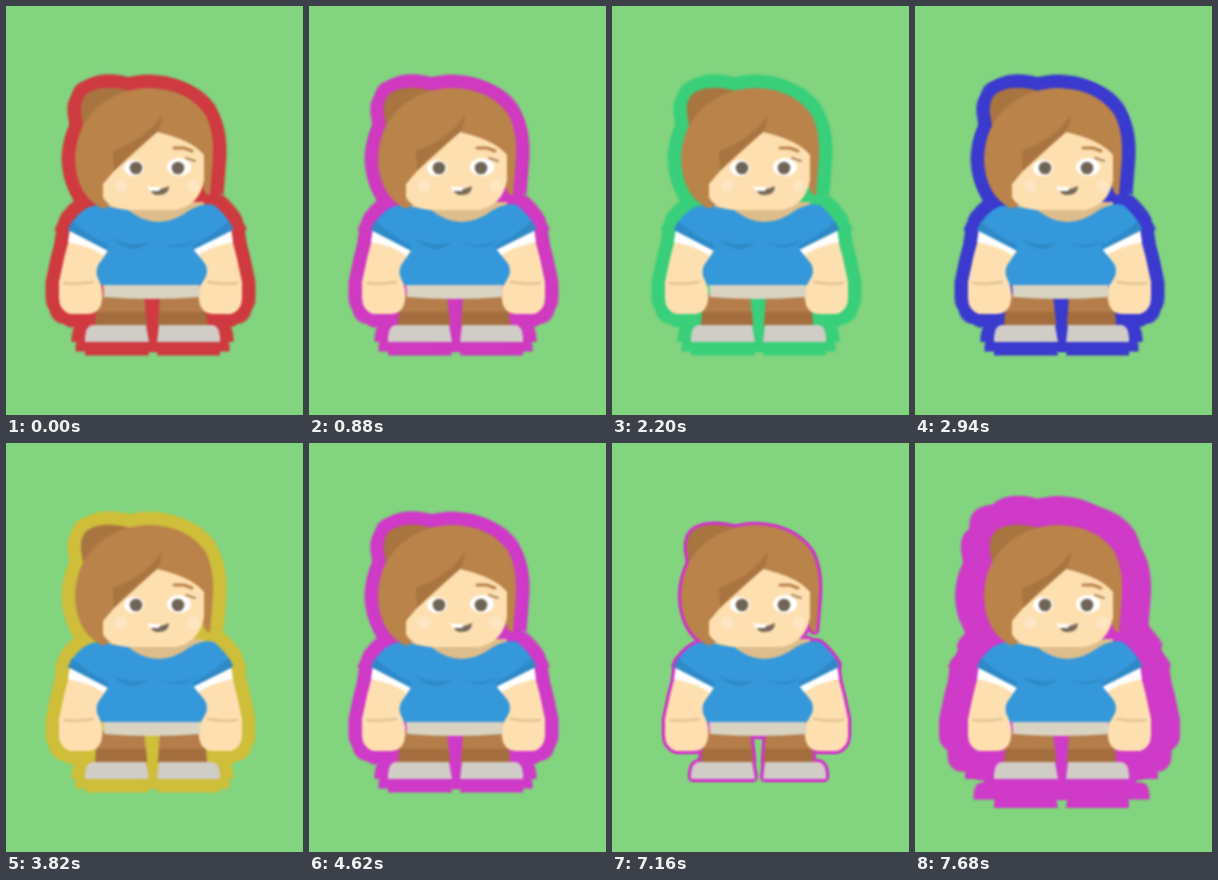
An HTML page with a canvas for the animation above (8000 ms loop, 297x409 px).

```html
<!DOCTYPE html>
<html lang="en">
<head>
<meta charset="utf-8">
<title>Outlined character</title>
<style>
  html, body { margin: 0; width: 100%; height: 100%; overflow: hidden; background: #82d47f; }
  canvas { display: block; }
</style>
</head>
<body>
<canvas id="stage" width="297" height="409"></canvas>
<script>
const W = 297, H = 409, LOOP = 8000, TICK = 73;
const ctx = document.getElementById('stage').getContext('2d');

const HAIR = '#b9834a', HAIR_DARK = '#a8743f', SKIN = '#fedfb0', SKIN_DARK = '#ddbd8b';
const SHIRT = '#3498db', SHIRT_DARK = '#2f89c6';

// Turning points [time, value]: the hue is swept down and up, then the thickness.
const HUE = [[500, 357], [1860, 50], [2616, 303], [3555, 20], [4590, 303]];
const THICKNESS = [[6400, 13.5], [6850, 0], [7015, 0], [7650, 29]];

function valueAt(keys, t) {
  if (t <= keys[0][0]) return keys[0][1];
  for (let i = 1; i < keys.length; i++) {
    const [t0, v0] = keys[i - 1], [t1, v1] = keys[i];
    if (t < t1) {
      const progress = (t - t0) / (t1 - t0);
      return v0 + (v1 - v0) * (1 - Math.cos(Math.PI * progress)) / 2;
    }
  }
  return keys[keys.length - 1][1];
}

function layer() {
  const c = document.createElement('canvas');
  c.width = W;
  c.height = H;
  return c.getContext('2d');
}

function drawCharacter(g) {
  const fill = (color, d) => { g.fillStyle = color; g.fill(new Path2D(d)); };
  const line = (color, width, d) => {
    g.strokeStyle = color;
    g.lineWidth = width;
    g.lineCap = 'round';
    g.stroke(new Path2D(d));
  };
  const oval = (color, x, y, rx, ry = rx) => {
    g.fillStyle = color;
    g.beginPath();
    g.ellipse(x, y, rx, ry, 0, 0, Math.PI * 2);
    g.fill();
  };
  const mirrored = draw => {
    draw();
    g.save();
    g.translate(289, 0);
    g.scale(-1, 1);
    draw();
    g.restore();
  };

  // Legs and shoes
  fill('#b47d4a', 'M92 288H138L141 320H90ZM154 288H198L201 320H152Z');
  fill('#a36d3d', 'M90 306H140L141 320H89ZM153 306H200L201 320H152Z');
  fill('#d0ccc6', 'M86 319H140L143 336H79V331Q80 320 86 319ZM153 319H207Q213 320 214 331V336H151Z');

  // Arms
  mirrored(() => {
    fill(SKIN, 'M65 226L103 241L103 255L92 270Q99 286 95 299Q91 309 79 308H64Q53 304 53 292V276Q58 250 65 226Z');
    fill('#fff', 'M64 222L103 240L98 250Q84 240 62 236Z');
    line(SKIN_DARK, 2, 'M58 277Q68 279 87 276');
  });

  // Neck and shirt
  fill('#d9d3c2', 'M97 276H193L194 291Q145 295 98 291Z');
  fill(SKIN_DARK, 'M92 196H198V212Q150 224 92 212Z');
  fill(SHIRT, 'M83 201Q94 197 108 202L122 204Q152 228 184 204Q198 196 208 199Q220 209 227 222L187 243' +
    'L197 255Q203 262 200 270L195 279H95L91 270Q89 262 95 255L102 245L62 224Q69 208 83 201Z');
  mirrored(() => fill(SHIRT_DARK, 'M66 215Q82 230 102 239L102 244L62 224Z'));
  fill(SHIRT_DARK, 'M106 232Q124 242 143 236Q125 252 106 232ZM155 237Q172 243 191 233Q174 247 155 237Z');

  // Head
  fill(HAIR_DARK, 'M75 108Q72 84 98 82Q112 81 126 86L110 125H78Z');
  fill(HAIR, 'M97 203Q70 190 69 153Q70 119 93 100Q115 82 144 82Q181 83 199 108Q208 124 207 151L204 189Q199 190 197 180L150 170Z');
  fill(SKIN, 'M151 126Q186 134 198 149V174Q194 199 170 204H122Q102 202 97 191V178L108 165Z');
  fill(HAIR_DARK, 'M107 145Q139 134 156 109Q155 121 150 127Q127 144 108 165Z');

  // Face
  oval('#fee6c5', 115, 180, 6);
  oval('#fee6c5', 187, 180, 6);
  oval('#fff', 128, 162, 10, 8);
  oval('#fff', 173, 161, 12, 9);
  oval('#6f6455', 130, 162, 6.3);
  oval('#6f6455', 172, 162, 6.3);
  line('#a88a66', 2, 'M180 152L189 155');
  line('#b9834a', 3, 'M168 142H178L186 145');
  fill('#75685a', 'M144 183Q153 185 163 180Q163 189 152 189Q146 189 144 183Z');
  fill('#fff', 'M141 180Q148 182 155 181L153 185H144Z');
}

const art = layer();
drawCharacter(art);
const character = layer();
character.filter = 'blur(1.1px)';
character.drawImage(art.canvas, 0, 0);
const tint = layer();

function drawOutline(color, thickness) {
  tint.globalCompositeOperation = 'copy';
  tint.drawImage(character.canvas, 0, 0);
  tint.globalCompositeOperation = 'source-in';
  tint.fillStyle = color;
  tint.fillRect(0, 0, W, H);
  for (let i = 0; i < 8; i++) {
    const angle = i * Math.PI / 4;
    ctx.drawImage(tint.canvas, thickness * Math.cos(angle), thickness * Math.sin(angle));
  }
}

function frame() {
  const time = performance.now() % LOOP;
  const t = 500 + Math.floor((time - 500) / TICK) * TICK;
  ctx.fillStyle = '#82d47f';
  ctx.fillRect(0, 0, W, H);
  const thickness = valueAt(THICKNESS, t);
  if (thickness > 0) drawOutline(`hsl(${valueAt(HUE, t)}, 61%, 52%)`, thickness);
  ctx.drawImage(character.canvas, 0, 0);
  requestAnimationFrame(frame);
}
frame();
</script>
</body>
</html>
```
